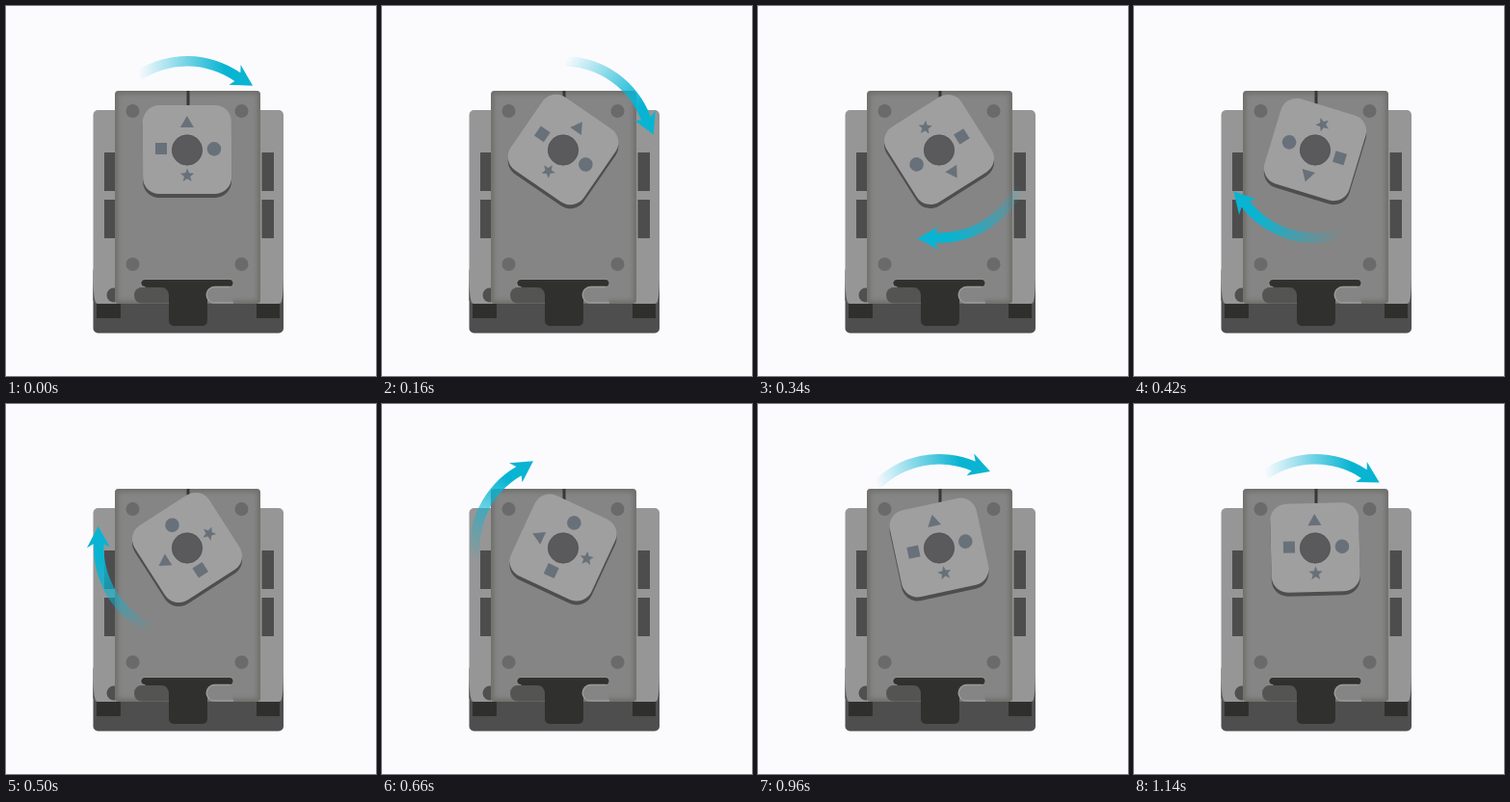
An HTML page for the animation above (1.16 s loop, 384x384 px).

```html
<!DOCTYPE html>
<html lang="en">
<head>
<meta charset="utf-8">
<title>Rotating dial</title>
<style>
  html, body { margin: 0; width: 100%; height: 100%; overflow: hidden; background: #fbfbfe; }
  svg { display: block; width: 100%; height: 100%; }
</style>
</head>
<body>
<svg viewBox="0 0 384 384">
  <defs>
    <linearGradient id="fade" gradientUnits="userSpaceOnUse" x1="-51" x2="40" y1="0" y2="0">
      <stop offset="0" stop-color="#08b4d2" stop-opacity="0"/>
      <stop offset="1" stop-color="#08b4d2"/>
    </linearGradient>
    <filter id="soft"><feGaussianBlur stdDeviation="2.5"/></filter>
    <clipPath id="plateClip"><rect x="113" y="88" width="151" height="221" rx="4"/></clipPath>
    <rect id="block" x="-46" y="-46" width="92" height="92" rx="17"/>
  </defs>

  <!-- base -->
  <rect x="90.5" y="270" width="197.5" height="69.5" rx="5" fill="#4e4e4e"/>
  <path d="M94 307h25v17h-25zM260 307h24v17h-24z" fill="#2f302d"/>
  <rect x="90.5" y="108" width="197.5" height="201" rx="5" fill="#969696"/>
  <path d="M90.5 278q0 27 3 30q-3 0-3-4zM288 278q0 27-3 30q3 0 3-4z" fill="#4e4e4e"/>
  <path d="M102 152h13v40h-13zM102 201h13v40h-13zM265.5 152h12.5v40h-12.5zM265.5 201h12.5v40h-12.5z" fill="#4d4d4d"/>
  <circle cx="112" cy="300" r="7.5" fill="#505050"/>

  <!-- plate -->
  <g clip-path="url(#plateClip)">
    <rect x="113" y="88" width="151" height="221" fill="#858585"/>
    <rect x="113" y="88" width="151" height="221" rx="4" fill="none" stroke="#6c6c68" stroke-width="6" filter="url(#soft)"/>
  </g>
  <path d="M189 88v15" stroke="#373737" stroke-width="3"/>
  <g fill="#6a6a6a">
    <circle cx="131.500" cy="109" r="7"/><circle cx="244.500" cy="109" r="7"/>
    <circle cx="131.500" cy="268" r="7"/><circle cx="244.500" cy="268" r="7"/>
  </g>
  <path d="M144 287.500H232" stroke="#91918f" stroke-width="9" stroke-linecap="round"/>
  <path d="M144 287.500H232" stroke="#323330" stroke-width="7" stroke-linecap="round"/>
  <rect x="133" y="292" width="42" height="16.500" rx="8" fill="#545453"/>
  <path d="M140 287H232V291H216a8.500 8.500 0 0 0-7 9V326q0 6-6 6H175q-6 0-6-6V300q-1-8-8-8H145z" fill="#30312e"/>
  <path d="M232 291.500H216.500a8.300 8.300 0 0 0 0 16.600H236" fill="#858585" stroke="#9a9a98" stroke-width="1.500"/>

  <!-- dial -->
  <g transform="translate(188 149)">
    <g transform="translate(0 4)"><use class="spin" href="#block" fill="#4e4e4e"/></g>
    <g class="spin">
      <use href="#block" fill="#9f9f9f"/>
      <g fill="#68717a">
        <path d="M0-35L7-23H-7z"/>
        <rect x="-33" y="-7" width="12" height="12"/>
        <circle cx="28" cy="-.5" r="7.300"/>
        <path id="star"/>
      </g>
    </g>
    <circle cy=".5" r="15.700" fill="#5a5a5d" stroke="#4e4e51" stroke-width=".7"/>
    <path id="arrow" class="spin" fill="url(#fade)"/>
  </g>
</svg>
<script>
const LOOP = 1160, TURN = 1200, DELAY = 40;
const $ = id => document.getElementById(id);

// Point at a radius and a clockwise angle from the top.
const polar = (r, deg) => {
  const a = deg * Math.PI / 180;
  return `${(r * Math.sin(a)).toFixed(2)} ${(-r * Math.cos(a)).toFixed(2)}`;
};

const starPoints = Array.from({ length: 10 }, (_, i) => polar(i % 2 ? 3.3 : 7.5, i * 36));
$('star').setAttribute('d', `M${starPoints.join('L')}Z`);
$('star').setAttribute('transform', 'translate(0 27)');

$('arrow').setAttribute('d',
  `M${polar(97, -33)}A97 97 0 0 1 ${polar(97, 35)}L${polar(104, 32.5)}L${polar(95, 46)}` +
  `L${polar(80, 33)}L${polar(86.5, 35)}A86.5 86.5 0 0 0 ${polar(86.5, -33)}Z`);

// cubic-bezier(.25, .1, .25, 1)
function ease(x) {
  let lo = 0, hi = 1;
  for (let i = 0; i < 30; i++) {
    const s = (lo + hi) / 2;
    if (.75 * s * (1 - s) + s ** 3 < x) lo = s; else hi = s;
  }
  const u = 1 - lo;
  return .3 * lo * u * u + 3 * lo * lo * u + lo ** 3;
}

const spinning = document.querySelectorAll('.spin');
function draw(now) {
  const t = now % LOOP;
  const angle = 360 * ease((t + TURN - DELAY) % TURN / TURN);
  spinning.forEach(el => el.setAttribute('transform', `rotate(${angle})`));
}

const start = performance.now();
function tick() {
  draw(performance.now() - start);
  requestAnimationFrame(tick);
}
tick();
</script>
</body>
</html>
```
